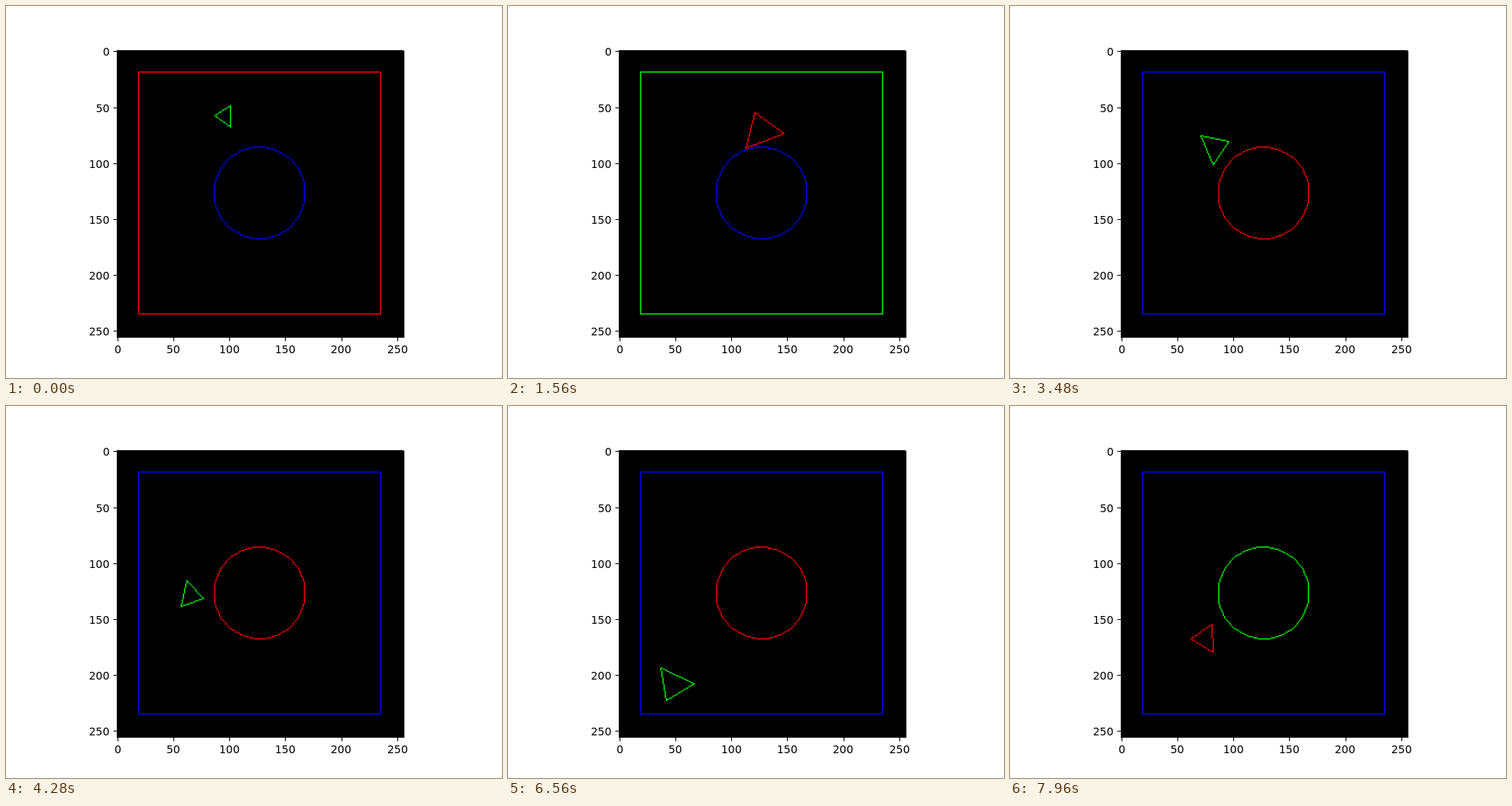
Animation, 640 px wide and 480 px high, one loop 8000 ms. Source, as an HTML page with a canvas:

```html
<!DOCTYPE html>
<html lang="en">
<head>
<meta charset="utf-8">
<title>Bouncing triangle</title>
<style>
  html, body { margin: 0; width: 100%; height: 100%; overflow: hidden; background: #fff; }
  canvas { position: absolute; left: 143px; top: 57px; }
  svg { position: absolute; left: 0; top: 0; width: 640px; height: 480px; }
  path { fill: none; stroke: #000; stroke-width: 1.11; }
  text { font: 13.889px "DejaVu Sans", sans-serif; }
</style>
</head>
<body>
<canvas id="plot" width="370" height="370"></canvas>
<svg id="axes" viewBox="0 0 640 480"></svg>
<script>
const GRID = 256, PLOT = 370, STEP = 40, STEPS = 200;
const COLORS = { red: "#f00", green: "#0f0", blue: "#00f" };

// step, velocity after it, and the shape hit, which trades colours with the triangle
const BOUNCES = [
  [13, 1, 2, "square"],
  [39, -1, -2, "circle"],
  [61, -1, 2, "square"],
  [138, 0, 2, "square"],
  [145, 1, 2, null],
  [157, 1, -2, "square"],
  [193, -1, 2, "circle"]
];
const isGrowing = step => step < 40 || (step >= 124 && step < 156);

function simulate() {
  const states = [], colors = { square: "red", triangle: "green", circle: "blue" };
  let x = 96.8, y = 58.8, radius = 9.7, vx = 1, vy = -2;
  for (let step = 0; step < STEPS; step++) {
    const angle = Math.PI * (1 + step / 100);
    states.push({ x, y, radius, angle, colors: { ...colors } });
    const bounce = BOUNCES.find(b => b[0] === step);
    if (bounce) {
      const hit = bounce[3];
      [, vx, vy] = bounce;
      if (hit) [colors.triangle, colors[hit]] = [colors[hit], colors.triangle];
    }
    // Scaling is anchored off-centre, so a change of size also shifts the triangle.
    const growth = isGrowing(step) ? 0.22 : -0.1;
    radius += growth;
    x += vx - growth;
    y += vy - 1.45 * growth;
  }
  return states;
}

const grid = document.createElement("canvas");
grid.width = grid.height = GRID;
const pen = grid.getContext("2d", { willReadFrequently: true });
const plot = document.getElementById("plot").getContext("2d");
const output = plot.createImageData(PLOT, PLOT);

function line([x, y], [x2, y2]) {
  const dx = Math.abs(x2 - x), dy = -Math.abs(y2 - y);
  const sx = Math.sign(x2 - x), sy = Math.sign(y2 - y);
  let error = dx + dy;
  for (;;) {
    pen.fillRect(x, y, 1, 1);
    if (x === x2 && y === y2) return;
    const twice = 2 * error;
    if (twice >= dy) { error += dy; x += sx; }
    if (twice <= dx) { error += dx; y += sy; }
  }
}

function outline(points, color) {
  pen.fillStyle = COLORS[color];
  const cells = points.map(p => p.map(Math.floor));
  cells.forEach((p, i) => line(p, cells[(i + 1) % cells.length]));
}

const square = [[19, 19], [235, 19], [235, 235], [19, 235]];
const circle = Array.from({ length: 64 }, (_, i) => {
  const a = i * Math.PI / 32;
  return [127.5 + 40.4 * Math.cos(a), 127.5 + 41.2 * Math.sin(a)];
});

function triangle({ x, y, radius, angle }) {
  const c = radius * Math.cos(angle), s = radius * Math.sin(angle);
  return [[1, 0], [-0.5, 1], [-0.5, -1]].map(([p, q]) => [x + p * c - q * s, y + p * s + q * c]);
}

// Hann-weighted neighbours of each output pixel along one axis
const taps = Array.from({ length: PLOT }, (_, i) => {
  const u = (i + 0.5) * GRID / PLOT - 0.5, cell = Math.floor(u);
  return {
    a: Math.max(cell, 0),
    b: Math.min(cell + 1, GRID - 1),
    w: (1 - Math.cos(Math.PI * (u - cell))) / 2
  };
});

function enlarge() {
  const source = pen.getImageData(0, 0, GRID, GRID).data;
  const mix = (p, q, w) => p + (q - p) * w;
  let i = 0;
  for (const row of taps) {
    for (const col of taps) {
      for (let ch = 0; ch < 4; ch++) {
        const at = (x, y) => source[(y * GRID + x) * 4 + ch];
        output.data[i++] = mix(
          mix(at(col.a, row.a), at(col.b, row.a), col.w),
          mix(at(col.a, row.b), at(col.b, row.b), col.w),
          row.w
        );
      }
    }
  }
  plot.putImageData(output, 0, 0);
}

function draw(state) {
  pen.fillStyle = "#000";
  pen.fillRect(0, 0, GRID, GRID);
  outline(square, state.colors.square);
  outline(circle, state.colors.circle);
  outline(triangle(state), state.colors.triangle);
  enlarge();
}

function buildAxes() {
  const digit = 8.84;
  let marks = '<path d="M143.5 58.5h370v369h-370z"/>';
  for (let n = 0; n <= 250; n += 50) {
    const offset = (n + 0.5) * 369.6 / GRID, x = 143.2 + offset, y = 57.6 + offset;
    const width = digit * String(n).length;
    marks += `<path d="M${Math.round(x) + 0.5} 427.5v5M143.5 ${Math.round(y) + 0.5}h-5"/>
      <text x="${Math.round(x - width / 2)}" y="448">${n}</text>
      <text x="${Math.round(133.5 - width)}" y="${Math.round(y + 6.1)}">${n}</text>`;
  }
  document.getElementById("axes").innerHTML = marks;
}

const states = simulate();
const start = performance.now();
let shown = -1;
function tick() {
  const step = Math.floor((performance.now() - start) / STEP) % STEPS;
  if (step !== shown) draw(states[shown = step]);
  requestAnimationFrame(tick);
}
buildAxes();
tick();
</script>
</body>
</html>
```
